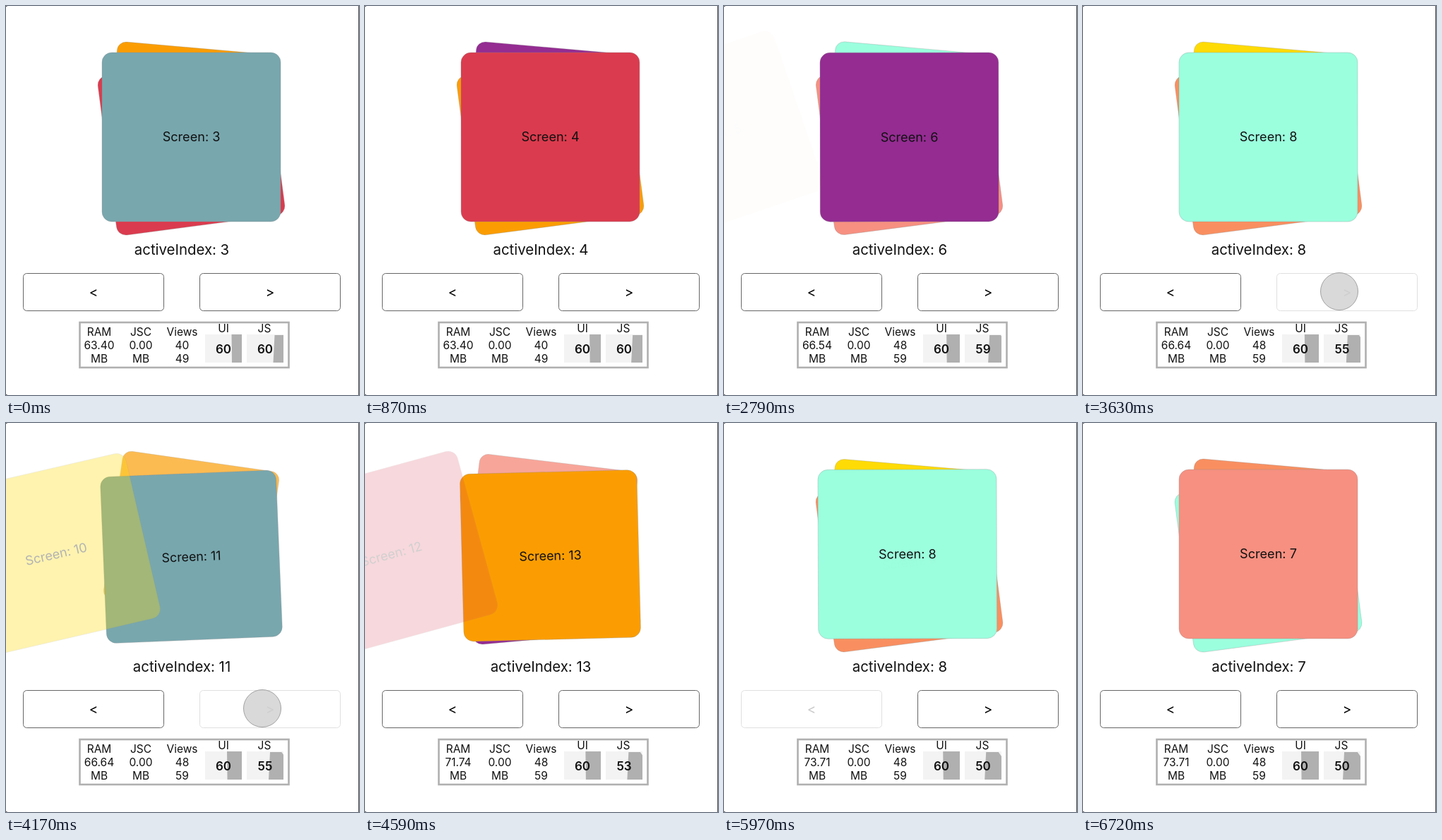
An HTML page that plays this animation: 500x552 px, repeating every 6750 ms.

```html
<!DOCTYPE html>
<html lang="en">
<head>
<meta charset="utf-8">
<title>Card stack</title>
<style>
html, body { margin: 0; width: 100%; height: 100%; overflow: hidden; background: #fff; }
svg { display: block; width: 500px; height: 552px; font-family: Inter, "Liberation Sans", sans-serif; }
text { text-anchor: middle; fill: #111; }
.card rect { stroke: #888; stroke-opacity: .45; stroke-width: .7; }
.card text { font-size: 18.1px; }
.button rect { fill: #fff; stroke: #666; }
.button text { font-size: 19px; fill: #000; }
.stats text { font-size: 15.5px; }
.stats .fps { font-size: 17px; font-weight: 600; }
</style>
</head>
<body>
<svg id="stage" viewBox="0 0 500 552">
  <path d="M499.5 0V552M0 .5H1.5M0 551.5H1.5" stroke="#555"/>
  <g id="cards"></g>
  <text id="label" x="249" y="353" font-size="20.4"></text>
  <g id="prev" class="button">
    <rect x="24.5" y="379.5" width="199" height="53" rx="5"/>
    <text x="124" y="413">&lt;</text>
  </g>
  <g id="next" class="button">
    <rect x="274.5" y="379.5" width="199" height="53" rx="5"/>
    <text x="374" y="413">&gt;</text>
  </g>
  <g class="stats">
    <rect x="104.5" y="449" width="296" height="64" fill="#fff" stroke="#b0b0b0" stroke-width="2.6"/>
    <text x="132" y="468">RAM</text>
    <text x="132" y="487" id="ram"></text>
    <text x="132" y="506">MB</text>
    <text x="191" y="468">JSC</text>
    <text x="191" y="487">0.00</text>
    <text x="191" y="506">MB</text>
    <text x="249.5" y="468">Views</text>
    <text x="249.5" y="487" id="views"></text>
    <text x="249.5" y="506" id="total"></text>
    <text x="308" y="463">UI</text>
    <text x="366" y="463">JS</text>
    <path d="M282 466h52v40h-52zM341 466h52v40h-52z" fill="#f3f3f3"/>
    <path id="graph" fill="#b0b0b0"/>
    <text class="fps" x="308" y="492.5">60</text>
    <text class="fps" x="367" y="492.5" id="js"></text>
  </g>
  <circle id="finger" r="26.5" fill="#d0d0d0" fill-opacity=".8" stroke="#a2a2a2"/>
</svg>
<script>
const LOOP = 6750, STEP = 30, FIRST = 3, LAST = 15;
const COLORS = ['#9bffde', '#f98f60', '#ffdb05', '#78a7ae', '#db3b4e', '#fb9d02', '#942c92', '#f79081'];

// Poses by place in the stack, from -1 (gone) to 3 (not yet in): x, y, rotation, scale, opacity
const POSES = [
  [-279, 0, -19, 1, 0],
  [0, 0, 0, 1, 1],
  [0, 12, -7.5, .95, 1],
  [0, -18.5, 5, .9, 1],
  [0, -44, 15, .85, 0]
];

// Swipes: touch time, release time, progress at touch, progress at release
const SWIPES = [[360, 540, .06, .42], [1290, 1570, 0, .42], [2230, 2510, 0, .42]];
const TAPS = {
  next: [2990, 3250, 3670, 3865, 4060, 4255, 4450],
  prev: [4865, 5065, 5265, 5465, 5665, 5975]
};
// Time, RAM, views, total views, JS rate
const STATS = [
  [0, '63.40', 40, 49, 60], [900, '63.42', 40, 49, 58], [1950, '66.54', 48, 59, 59],
  [3150, '66.64', 48, 59, 55], [4200, '71.74', 48, 59, 53], [5250, '73.71', 48, 59, 50]
];

const $ = id => document.getElementById(id);
const clamp = (v, lo = 0, hi = 1) => Math.min(hi, Math.max(lo, v));
const ramp = (t, a, b) => clamp((t - a) / (b - a));
const setText = (id, value) => { $(id).textContent = value; };

// Critically damped step response
function spring(ms) {
  const u = Math.max(0, ms) * .022;
  return 1 - (1 + u) * Math.exp(-u);
}

function dragged([a, b, from, to], t) {
  return from + (to - from) * ramp(t, a, b) ** 1.4;
}

function position(t) {
  let pos = FIRST + .06 * ramp(t, 0, 210);
  for (const s of SWIPES) pos += dragged(s, t) - s[2] + (1 - s[3]) * spring(t - s[1]);
  for (const r of TAPS.next) pos += spring(t - r);
  for (const r of TAPS.prev) pos -= spring(t - r);
  return pos;
}

function pose(place) {
  const p = clamp(place, -1, 3) + 1;
  const i = Math.min(3, Math.floor(p));
  return POSES[i].map((v, k) => v + (POSES[i + 1][k] - v) * (p - i));
}

function pressOpacity(taps, t) {
  return Math.min(...taps.map(r => t < r - 90 ? 1 : .2 + .8 * ramp(t, r, r + 130)));
}

function touch(t) {
  if (t >= 30 && t < 360) return [288 - 17 * ramp(t, 0, 210), 253];
  for (const s of SWIPES) {
    if (t >= s[0] && t <= s[1]) return [288 - 279 * dragged(s, t), 253];
  }
  const down = r => t >= r - 100 && t < r - 10;
  if (TAPS.next.some(down)) return [363, 405];
  if (TAPS.prev.some(down)) return [124, 405];
  return null;
}

const cards = [];
for (let i = LAST; i >= FIRST; i--) {
  const g = document.createElementNS('http://www.w3.org/2000/svg', 'g');
  g.setAttribute('class', 'card');
  g.innerHTML = `<rect x="-126.5" y="-120" width="253" height="240" rx="14" fill="${COLORS[i % 8]}"/>` +
    `<text y="6.3">Screen: ${i}</text>`;
  $('cards').append(g);
  cards.push({ i, g });
}

function drawStats(t) {
  const [, ram, views, total, js] = STATS.filter(s => s[0] <= t).pop();
  setText('ram', ram);
  setText('views', views);
  setText('total', total);
  setText('js', js);
  const shift = 10.5 * t / LOOP;
  const ui = 319.5 - shift, left = 379 - shift;
  const dip = 6 * ramp(t, 1800, 5500);
  $('graph').setAttribute('d',
    `M${ui} 466H334V506H${ui + .5}ZM${left + 1.5} 467H${393 - dip * .7}L393 ${467 + dip}V506H${left - .5}Z`);
}

function draw(t) {
  const pos = position(t), active = Math.round(pos);
  for (const { i, g } of cards) {
    const [x, y, turn, scale, alpha] = pose(i - pos);
    const shown = i >= active - 1 && i <= active + 2 && alpha > .004;
    g.style.display = shown ? '' : 'none';
    g.setAttribute('transform', `translate(${262.5 + x} ${186 + y}) rotate(${turn}) scale(${scale})`);
    g.setAttribute('opacity', alpha);
  }
  setText('label', 'activeIndex: ' + active);
  for (const id in TAPS) $(id).setAttribute('opacity', pressOpacity(TAPS[id], t));
  const at = touch(t);
  $('finger').style.display = at ? '' : 'none';
  if (at) $('finger').setAttribute('transform', `translate(${at})`);
  drawStats(t);
}

const start = performance.now();
function tick() {
  const t = (performance.now() - start) % LOOP;
  draw(Math.floor(t / STEP) * STEP);
  requestAnimationFrame(tick);
}
tick();
</script>
</body>
</html>
```
